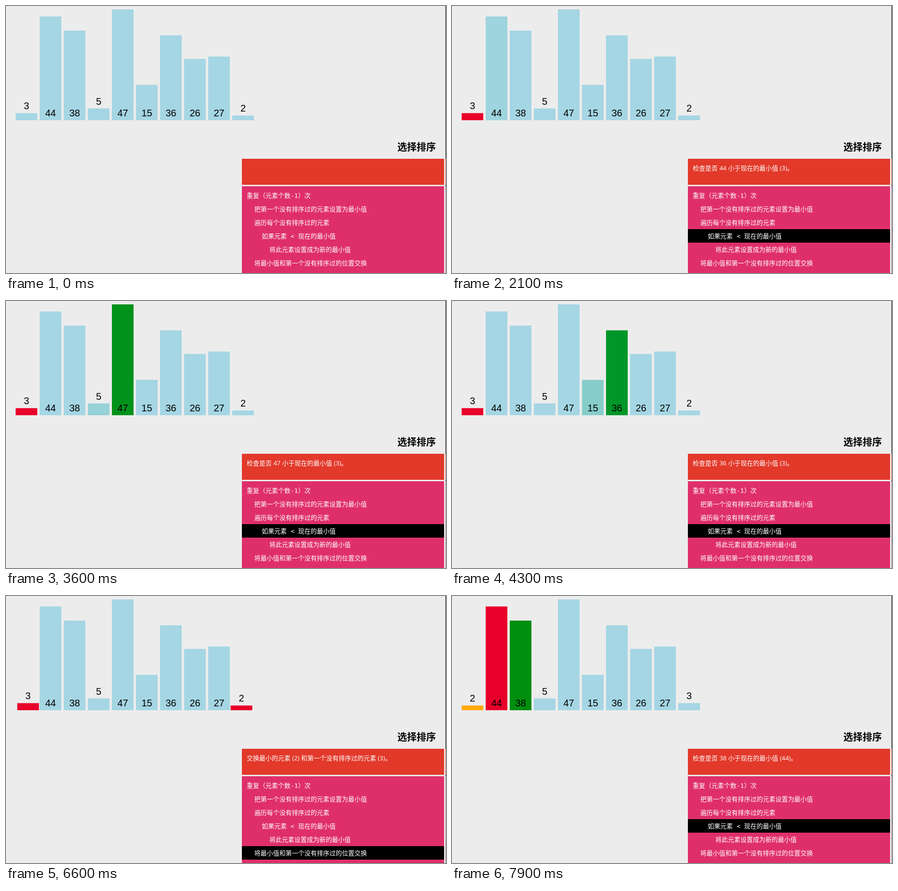
Write an HTML page with a canvas that moves like this. It is 914 px wide and 554 px high and loops after 8 s.

```html
<!DOCTYPE html>
<html lang="zh-CN">
<head>
<meta charset="utf-8">
<title>选择排序</title>
<style>
html, body { margin: 0; width: 100%; height: 100%; overflow: hidden; background: #ececec; }
canvas { display: block; }
</style>
</head>
<body>
<canvas id="stage" width="914" height="554"></canvas>
<script>
const ctx = document.getElementById('stage').getContext('2d');
const LOOP = 8000, TICK = 100, FADE = 250;
const CJK = '"Noto Sans CJK SC", "Noto Sans CJK"';
const SANS = `13px "Open Sans", ${CJK}, sans-serif`;
const MONO = `13px "DejaVu Sans Mono", ${CJK}, monospace`;

const values = [3, 44, 38, 5, 47, 15, 36, 26, 27, 2];
const lines = [
  '重复（元素个数-1）次',
  '  把第一个没有排序过的元素设置为最小值',
  '  遍历每个没有排序过的元素',
  '    如果元素 < 现在的最小值',
  '      将此元素设置成为新的最小值',
  '  将最小值和第一个没有排序过的位置交换'
];
// Green has a negative red part so that fades stay saturated.
const colors = { B: [165, 214, 228], G: [-80, 142, 14], R: [232, 0, 42], O: [255, 170, 0] };

// Spans in which the picture moves; it holds still between them.
const spans = [[1900, 2300], [2600, 3100], [3500, 3900], [4300, 4700],
               [5000, 5500], [5800, 6300], [6600, 7000], [7400, 7900]];

const steps = [];
function addStep(start, text, rows, marks, swapped = false) {
  const fill = values.map((_, i) => colors[marks[i] || 'B']);
  const slot = values.map((_, i) => i);
  if (swapped) [slot[0], slot[9]] = [9, 0];
  steps.push({ start, text, rows, fill, slot });
}
const setMin = v => `将 ${v} 设置为当前最小值，然后遍历剩下的没有排序过的元素。`;
const check = (v, min) => `检查是否 ${v} 小于现在的最小值 (${min})。`;
const swapText = '交换最小的元素 (2) 和第一个没有排序过的元素 (3)。';

addStep(-FADE, '', [], {});
addStep(1810, setMin(3), [1, 2], { 0: 'R' });
[2050, 2540, 2791, 3410, 3650, 4128, 4430, 4940, 5220].forEach((start, i) =>
  addStep(start, check(values[i + 1], 3), [3], { 0: 'R', [i + 1]: 'G' }));
addStep(5740, '将 2 设置为新的最小值。', [4], { 9: 'R' });
addStep(6030, swapText, [5], { 0: 'R', 9: 'R' });
addStep(6569, swapText, [5], { 0: 'R', 9: 'R' }, true);
addStep(6800, '元素 2 现在是排序过的元素。', [5], { 9: 'O' }, true);
addStep(7340, setMin(44), [1, 2], { 9: 'O', 1: 'R' }, true);
addStep(7620, check(38, 44), [3], { 9: 'O', 1: 'R', 2: 'G' }, true);

const lerp = (a, b, k) => a + (b - a) * k;
const ease = k => k < .5 ? 4 * k ** 3 : 1 - 4 * (1 - k) ** 3;

function clock(ms) {
  const t = Math.floor(ms % LOOP / TICK) * TICK;
  let held = 0;
  for (const [from, to] of spans) {
    if (t >= from) held = Math.min(t, to);
  }
  return held;
}

function rect(color, x, y, w, h) {
  ctx.fillStyle = color;
  ctx.fillRect(x, y, w, h);
}

function label(text, x, y, font, color, align = 'left') {
  ctx.font = font;
  ctx.fillStyle = color;
  ctx.textAlign = align;
  ctx.fillText(text, x, y);
}

function drawBars(prev, step, k) {
  const bars = values.map((v, i) => {
    const h = v * 230 / 47;
    return {
      v, h, x: 20 + 50 * lerp(prev.slot[i], step.slot[i], k), y: 237 - h,
      rgb: step.fill[i].map((c, j) => Math.max(0, Math.round(lerp(prev.fill[i][j], c, k))))
    };
  });
  for (const b of bars) rect(`rgb(${b.rgb})`, b.x, b.y, 45, b.h);
  for (const b of bars) {
    const base = b.v < 10 ? Math.round(b.y - 8) : 229;
    label(b.v, b.x + 22.5, base, '20px "Liberation Sans", Arial, sans-serif', '#000', 'center');
  }
}

function drawPanel(step) {
  label('选择排序', 893, 300, `bold 20px ${CJK}, sans-serif`, '#000', 'right');
  rect('#e2392a', 490, 317, 420, 54);
  rect('#df2f6a', 490, 374, 420, 180);
  for (const r of step.rows) rect('#000', 490, 379 + 28 * r, 420, 28);
  label(step.text, 500, 341, SANS, '#fff');
  lines.forEach((line, i) => label(line, 500, 398 + 28 * i, MONO, '#fff'));
  rect('#000', 913, 0, 1, 374);
  rect('#e2392a', 913, 317, 1, 54);
  rect('#9a6a9a', 913, 374, 1, 180);
}

function draw(ms) {
  const t = clock(ms);
  let n = 0;
  while (n + 1 < steps.length && steps[n + 1].start <= t) n++;
  const step = steps[n], prev = steps[Math.max(0, n - 1)];
  rect('#ececec', 0, 0, 914, 554);
  drawBars(prev, step, ease(Math.min(1, (t - step.start) / FADE)));
  drawPanel(step);
}

let begin;
function loop(now) {
  begin ??= now;
  draw(now - begin);
  requestAnimationFrame(loop);
}
draw(0);
requestAnimationFrame(loop);
</script>
</body>
</html>
```
